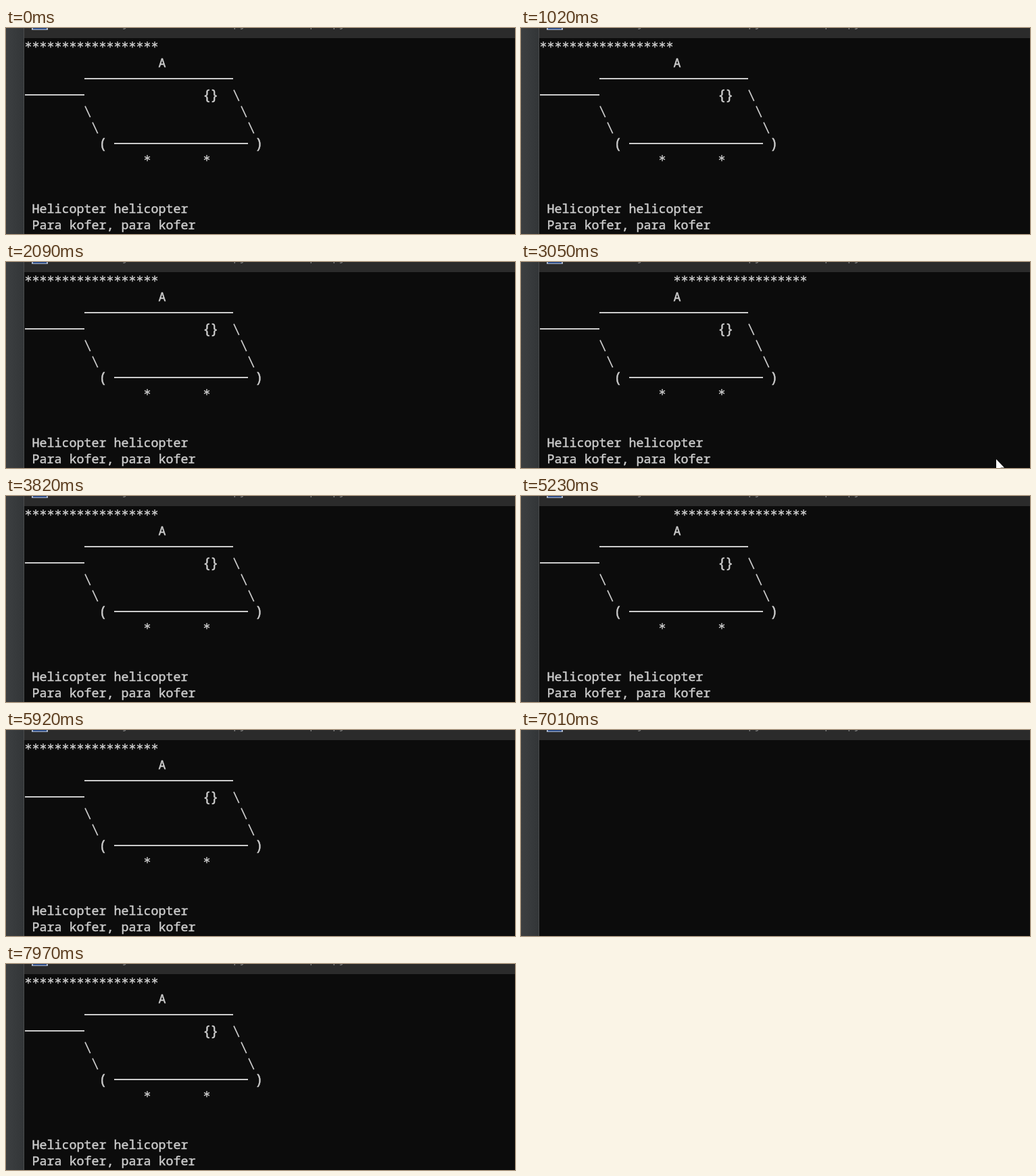
These frames come from a looping animation (753x305 px, 8000 ms). An HTML page with a canvas:

```html
<!DOCTYPE html>
<html lang="en">
<head>
<meta charset="utf-8">
<title>Console helicopter</title>
<style>
  html, body { margin: 0; width: 100%; height: 100%; overflow: hidden; background: #0c0c0c; }
  canvas { display: block; }
</style>
</head>
<body>
<canvas id="stage" width="753" height="305"></canvas>
<script>
const ctx = document.getElementById('stage').getContext('2d');
const LOOP = 8000, CELL = 11, ROW = 24, LEFT = 28, BASE = 34;
const INK = '#cccccc';
const MONO = '"Noto Sans Mono", "DejaVu Sans Mono", monospace';

// The blade flips at an uneven pace: [ms, flips so far]
const PACE = [[0, 0], [210, 3], [1020, 10], [1630, 17], [2090, 22], [3050, 35],
  [4550, 53], [5920, 70], [6390, 75], [6740, 78], [7480, 86], [7970, 92]];
const CLEAR = 0.1; // share of each flip during which the console is cleared

const SCREEN = [
  '',
  ' '.repeat(18) + 'A',
  ' '.repeat(8) + '-'.repeat(20),
  '-'.repeat(8) + ' '.repeat(16) + '{}  \\',
  ' '.repeat(8) + '\\' + ' '.repeat(20) + '\\',
  ' '.repeat(9) + '\\' + ' '.repeat(20) + '\\',
  ' '.repeat(10) + '( ' + '-'.repeat(18) + ' )',
  ' '.repeat(16) + '*       *',
  '',
  '',
  ' Helicopter helicopter',
  ' Para kofer, para kofer'
];

function flipsAt(t) {
  const i = PACE.findIndex(([time]) => time > t);
  if (i < 0) return PACE.at(-1)[1];
  const [t0, n0] = PACE[i - 1], [t1, n1] = PACE[i];
  return n0 + (n1 - n0) * (t - t0) / (t1 - t0) + 1e-6;
}

function box(color, x, y, w, h) {
  ctx.fillStyle = color;
  ctx.fillRect(x, y, w, h);
}

function line(x1, y1, x2, y2, width) {
  ctx.lineWidth = width;
  ctx.beginPath();
  ctx.moveTo(x1, y1);
  ctx.lineTo(x2, y2);
  ctx.stroke();
}

function star(x, y) {
  for (let i = 0; i < 3; i++) {
    const a = Math.PI / 2 + i * Math.PI / 3;
    const dx = 4.6 * Math.cos(a), dy = 4.6 * Math.sin(a);
    line(x - dx, y - dy, x + dx, y + dy, 1.4);
  }
}

function glyph(ch, x, y, size) {
  ctx.font = `${size}px ${MONO}`;
  ctx.lineWidth = 0.45;
  ctx.fillText(ch, x, y);
  ctx.strokeText(ch, x, y);
}

// Writes one string on the console grid
function put(text, col, row) {
  const y = BASE + row * ROW;
  [...text].forEach((ch, i) => {
    const x = LEFT + (col + i) * CELL;
    if (ch === '*') star(x + 5, y - 9.4);
    else if (ch === '\\') line(x + 1, y - 14.3, x + 8.7, y + 2.2, 1.7);
    else if (ch === '-') ctx.fillRect(x, y - 8, CELL, 2);
    else if ('(){}'.includes(ch)) glyph(ch, x - 1, y + 0.5, 21);
    else if (ch !== ' ') glyph(ch, x - 0.4, y, 18.333);
  });
}

function drawWindow() {
  box('#0c0c0c', 0, 0, 753, 305);
  box('#2b2b2b', 27, 0, 726, 15);

  const edge = ctx.createLinearGradient(0, 0, 26, 0);
  edge.addColorStop(0, '#3c3f41');
  edge.addColorStop(1, '#333638');
  box(edge, 0, 0, 26, 305);
  box('#4b4d4e', 26, 0, 1, 305);

  // Lower edge of the cropped title
  box('#a9b4c8', 38, 0, 24, 3);
  box('#2f4f8a', 40, 0, 20, 2);
  ctx.fillStyle = '#808080';
  ctx.font = '18px "Open Sans", sans-serif';
  [['\\', 80], ['y', 173], ['\\', 243], ['py', 336], ['p', 449], ['py', 483]]
    .forEach(([text, x]) => ctx.fillText(text, x, -2));
}

function drawHelicopter(side) {
  ctx.fillStyle = ctx.strokeStyle = INK;
  put('*'.repeat(18), side * 18, 0);
  SCREEN.forEach((text, row) => put(text, 0, row));
}

// The pointer slides in from the right and drops out below
function drawPointer(t) {
  if (t < 2880 || t > 3180) return;
  const d = t - 3050;
  ctx.save();
  ctx.translate(703 + Math.max(0, -d) * 0.3, 292 + Math.max(0, d) * 0.1);
  ctx.fillStyle = '#ffffff';
  ctx.fill(new Path2D('M0 0V17L4 13.5L7 20L9.5 19L6.5 12.5H12Z'));
  ctx.restore();
}

function draw(now) {
  const t = now % LOOP;
  const flips = flipsAt(t);
  drawWindow();
  if (flips % 1 < 1 - CLEAR) drawHelicopter(Math.floor(flips) % 2);
  drawPointer(t);
  requestAnimationFrame(draw);
}

draw(0);
</script>
</body>
</html>
```
